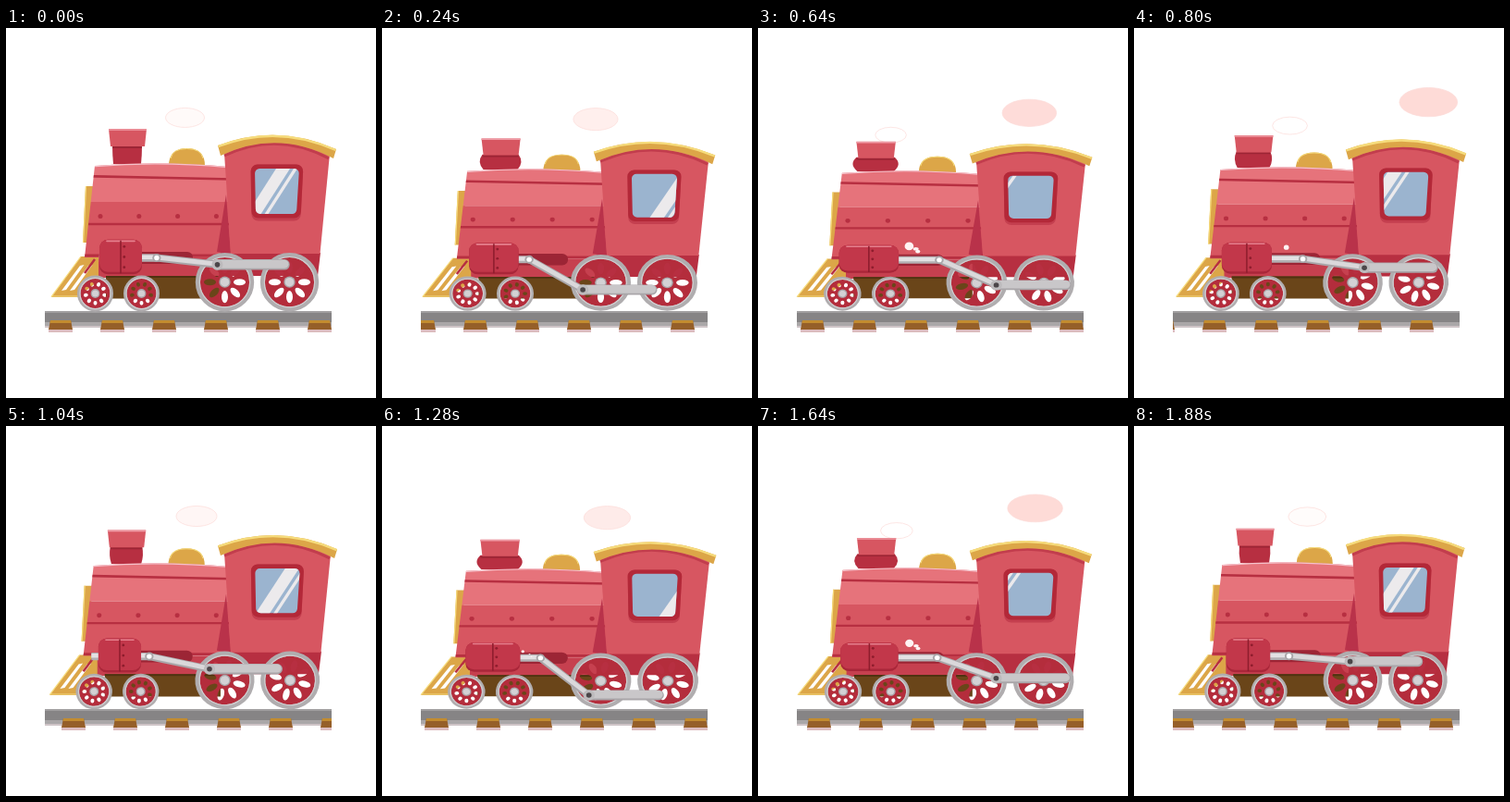
Recreate the animation shown at these times as an HTML page with a canvas. Size 400 by 400 pixels, loop 1.92 s.

```html
<!DOCTYPE html>
<html lang="en">
<head>
<meta charset="utf-8">
<title>Steam engine</title>
<style>
  html, body { margin: 0; width: 100%; height: 100%; overflow: hidden; background: #fff; }
  canvas { display: block; width: 400px; height: 400px; }
</style>
</head>
<body>
<canvas id="stage" width="400" height="400"></canvas>
<script>
const ctx = document.getElementById('stage').getContext('2d');
const LOOP = 1920, STEP = 40, TURN = 960, TAU = 2 * Math.PI;
const RED = '#d75661', LIGHT = '#e6737b', DARK = '#b72f41', DEEP = '#9c2535';
const GOLD = '#dca648', SUN = '#f6dc7c', STEEL = '#a9a6a9', SHINE = '#dad8da';

// Points are [x, y]; four values make a quadratic curve.
function trace(points) {
  ctx.beginPath();
  points.forEach((p, i) => {
    if (p.length > 2) ctx.quadraticCurveTo(...p);
    else if (i) ctx.lineTo(...p);
    else ctx.moveTo(...p);
  });
}
function shape(color, ...points) {
  trace(points);
  ctx.fillStyle = color;
  ctx.fill();
}
function line(color, width, ...points) {
  trace(points);
  ctx.lineWidth = width;
  ctx.strokeStyle = color;
  ctx.stroke();
}
function bar(color, width, x1, y1, x2, y2) {
  ctx.lineCap = 'round';
  line(color, width, [x1, y1], [x2, y2]);
  ctx.lineCap = 'butt';
}
function oval(color, x, y, rx, ry = rx) {
  ctx.beginPath();
  ctx.ellipse(x, y, rx, ry, 0, 0, TAU);
  ctx.fillStyle = color;
  ctx.fill();
}
function block(color, x, y, w, h, r = 0) {
  ctx.beginPath();
  ctx.roundRect(x, y, w, h, r);
  ctx.fillStyle = color;
  ctx.fill();
}
function ring(color, width, r) {
  ctx.beginPath();
  ctx.arc(0, 0, r, 0, TAU);
  ctx.lineWidth = width;
  ctx.strokeStyle = color;
  ctx.stroke();
}
// Draws inside its own saved state.
function scoped(drawing) {
  ctx.save();
  drawing();
  ctx.restore();
}

function smoke(age) {
  if (age < 80 || age > 1220) return;
  const x = 128 + 0.156 * age;
  const y = 94 + 0.007 * age + 0.07 * Math.max(0, 400 - age) - 0.08 * Math.max(0, age - 940);
  const r = 15.5 + 0.013 * age;
  const alpha = Math.min(1, Math.max(0, (age - 300) / 800));
  oval(`rgba(254,219,215,${alpha})`, x, y, r, r / 2);
  ctx.lineWidth = 0.7;
  ctx.strokeStyle = '#fcdcd9';
  ctx.stroke();
}

function rails(t) {
  ctx.beginPath();
  ctx.rect(42, 306, 310, 24);
  ctx.clip();
  block('#a19fa0', 42, 306, 310, 2);
  block('#868485', 42, 308, 310, 10);
  block('#aaa7a8', 42, 318, 310, 4);
  block('#cfc4c7', 42, 322, 310, 2);
  for (let x = 3 + (t * 0.175) % 56; x < 390; x += 56) {
    block('#dcbcbf', x - 13, 325, 26, 4);
    shape('#955f29', [x - 11, 316], [x + 11, 316], [x + 13, 326], [x - 13, 326]);
    shape('#c28c30', [x - 11, 316], [x + 11, 316], [x + 11.6, 319], [x - 11.6, 319]);
  }
}

function front() {
  shape(GOLD, [86, 171], [95, 171], [90, 232], [83, 232]);
  line(SUN, 1.2, [86.5, 171], [83.5, 232]);
  shape(GOLD, [81, 247], [103, 247], [104, 270], [78, 291], [49, 291]);
  line(SUN, 1.2, [81, 247], [49.5, 290], [78, 290]);
  for (const x of [80, 89])
    shape('#fff', [x, 257], [x + 4.5, 256], [x - 15, 283], [x - 20, 284]);
  line(DARK, 2.5, [96, 250], [85, 265]);
}

function dome() {
  shape(GOLD, [176, 149], [176, 130, 195.5, 130], [215, 130, 215, 149]);
  line(SUN, 1, [178, 141], [180, 130.5, 195.5, 130.5], [211, 130.5, 213, 141]);
}

function chimney(squash) {
  const top = 109 + 6 * squash, neck = top + 18, inset = 6 * squash, bulge = 12 * squash;
  shape(DARK, [115 - inset, neck], [147 + inset, neck], [147 + inset + bulge, (neck + 147) / 2, 146 + inset, 147],
    [116 - inset, 147], [115 - inset - bulge, (neck + 147) / 2, 115 - inset, neck]);
  line(DEEP, 2, [115 - inset, neck + 2], [147 + inset, neck + 2]);
  shape(RED, [111, top], [152, top], [150, top + 19], [113, top + 19]);
  line('#f09ca6', 1.6, [111, top + 1], [152, top + 1]);
}

function boiler() {
  scoped(() => {
    trace([[96, 149], [165, 143, 240, 150], [245, 270], [100, 270], [100, 248], [85, 248]]);
    ctx.clip();
    block(LIGHT, 80, 140, 170, 48);
    block(RED, 80, 188, 170, 60);
    block('#c6404f', 80, 248, 170, 22);
    line('#f5c2cb', 2.4, [96, 149], [165, 143, 240, 150]);
    line(DARK, 2.6, [80, 160], [245, 163.5]);
    line(DARK, 2.4, [80, 212], [245, 212]);
    line(DARK, 3, [80, 246], [245, 246]);
  });
  for (let i = 0; i < 4; i++) oval(DARK, 102 + i * 41.8, 203.5, 2.5);
  shape('#b9324a', [238, 180], [243, 245], [228, 242]);
  block('#6a4519', 108, 268, 124, 24.5);
  block('#4f3210', 108, 268, 124, 2);
}

function pane(color, grow, drop = 0) {
  const top = 152 - grow, bottom = 201 + grow + drop;
  const left = 269 - grow, right = 317 + grow, r = 5 + grow / 2;
  ctx.beginPath();
  ctx.moveTo(293, top);
  ctx.arcTo(right, top, right - 3, bottom, r);
  ctx.arcTo(right - 3, bottom, left + 1, bottom, r);
  ctx.arcTo(left + 1, bottom, left, top, r);
  ctx.arcTo(left, top, right, top, r);
  ctx.fillStyle = color;
  ctx.fill();
}

function cab(phase) {
  shape(DARK, [232, 243], [340, 243], [337, 268], [232, 268]);
  shape(RED, [236, 135], [293, 108, 350, 136], [339.5, 244], [243, 244]);
  line('#c23d4d', 3, [236, 138], [293, 111, 349, 141]);

  pane('#c43f4f', 4.5, 3);
  pane('#b32838', 4.5);
  scoped(() => {
    pane('#9bb4cf', 0);
    ctx.clip();
    const x = 292 + 0.115 * (phase > 500 ? phase - TURN : phase);
    for (const [gap, width] of [[0, 15], [19, 4]]) {
      const a = x + gap, b = a + width;
      shape('#eceaec', [a, 152], [b, 152], [b - 32, 202], [a - 32, 202]);
    }
  });

  shape(GOLD, [229, 127], [293, 102.5, 357, 131], [354, 141], [293, 109, 232, 138]);
  line(SUN, 2.4, [229.5, 128], [293, 103.5, 356.5, 132]);
}

function wheel(x, y, r, spin, holes, petal) {
  scoped(() => {
    ctx.translate(x, y);
    ctx.rotate(spin);
    const rim = r * 0.13 + 1, hub = r * 0.1 + 3;
    ctx.beginPath();
    ctx.arc(0, 0, r - rim + 0.5, 0, TAU);
    for (let i = 0; i < holes; i++) {
      const a = TAU * (0.25 + i / holes), c = Math.cos(a), s = Math.sin(a);
      const far = petal.at + petal.long;
      ctx.moveTo(c * far, s * far);
      ctx.ellipse(c * petal.at, s * petal.at, petal.long, petal.wide, a, 0, TAU);
    }
    ctx.fillStyle = '#b42d3c';
    ctx.fill('evenodd');
    ring('#b0adaf', rim, r - rim / 2);
    ring('#d0ced0', 1.2, r - rim + 0.6);
    oval(STEEL, 0, 0, hub);
    oval('#d3d1d4', 0, 0, hub - 1.4);
  });
}

function cylinder(phase) {
  const w = 55 - 9.5 * Math.cos(TAU * (phase - 50) / TURN), h = 53.5 - 0.35 * w;
  const x = 124, y = 247.5, left = x - w / 2, top = y - h / 2;
  block('#a92639', left, top, w, h, 9);
  block('#c2374a', left, top, w, h - 2.5, 9);
  bar('#e6808d', 1.6, left + 8, top + 1.6, left + w - 8, top + 1.6);
  line('#8e1d2d', 1.5, [x, top + 1], [x, top + h - 1]);
  for (const side of [-0.3, 0, 0.3]) oval('#8e1d2d', x + 3.8, y + side * h, 1.4);
}

function steam(phase) {
  const s = (phase - 300) / 560;
  if (s <= 0 || s >= 1) return;
  const x = 154 + 12 * Math.min(1, s * 3), y = 241 - 9 * Math.sin(Math.PI * s * s);
  const r = Math.sqrt(Math.sin(Math.PI * s));
  oval('#fff3f3', x, y, 4.8 * r);
  if (s > 0.8) return;
  oval('#fff3f3', x + 7, y + 3, 3 * r, 2 * r);
  oval('#fff3f3', x + 9, y + 6, 2.6 * r, 2 * r);
}

function drive(phase) {
  const spin = -TAU * phase / TURN, crank = spin - 113 * Math.PI / 180;
  const x1 = 236.5, x2 = 306.5, y = 274.7;

  block(DEEP, 130, 242, 72, 13, 6);
  for (const x of [96.5, 146.5])
    wheel(x, 287, 19.5, spin, 9, { at: 10.3, long: 2.4, wide: 2 });
  for (const x of [x1, x2])
    wheel(x, y, 31.7, spin, 8, { at: 16, long: 6.6, wide: 3.5 });

  // The crosshead slides level while the pin circles.
  const dx = 20.5 * Math.cos(crank), px = x1 + dx, py = y + 20.5 * Math.sin(crank);
  const hy = 248.5, hx = px - Math.sqrt(66 ** 2 - (py - hy) ** 2);
  const end = x2 + dx + 2.5;

  block('#b3b0b3', hx - 62, hy - 4.2, 62, 8.4);
  block('#e3e1e3', hx - 62, hy - 3, 62, 4.5);
  steam(phase);
  cylinder(phase);

  bar(STEEL, 11.5, px, py, end, py);
  bar('#c9c7c9', 9, px, py - 0.7, end, py - 0.7);
  bar(STEEL, 8, hx, hy, px, py);
  bar(SHINE, 5, hx, hy - 0.6, px, py - 0.6);
  oval('#bdbbbd', px, py, 6);
  oval('#4b4649', px, py, 2.8);
  oval(STEEL, hx, hy, 4.6);
  oval('#fff', hx, hy, 2.7);
}

function engine(phase) {
  const squash = 1 - Math.abs(phase - TURN / 2) / (TURN / 2);
  ctx.translate(237, 290);
  ctx.scale(1 + 0.055 * squash, 1 - 0.083 * squash);
  ctx.translate(-237, -290);
  front();
  dome();
  chimney(squash);
  boiler();
  cab(phase);
  drive(phase);
}

function draw(t) {
  const phase = t % TURN;
  ctx.clearRect(0, 0, 400, 400);
  smoke(phase + 420);
  smoke(phase - 540);
  scoped(() => rails(t));
  scoped(() => engine(phase));
}

const start = performance.now();
function tick() {
  const t = (performance.now() - start) % LOOP;
  draw(Math.floor(t / STEP) * STEP);
  requestAnimationFrame(tick);
}
tick();
</script>
</body>
</html>
```
